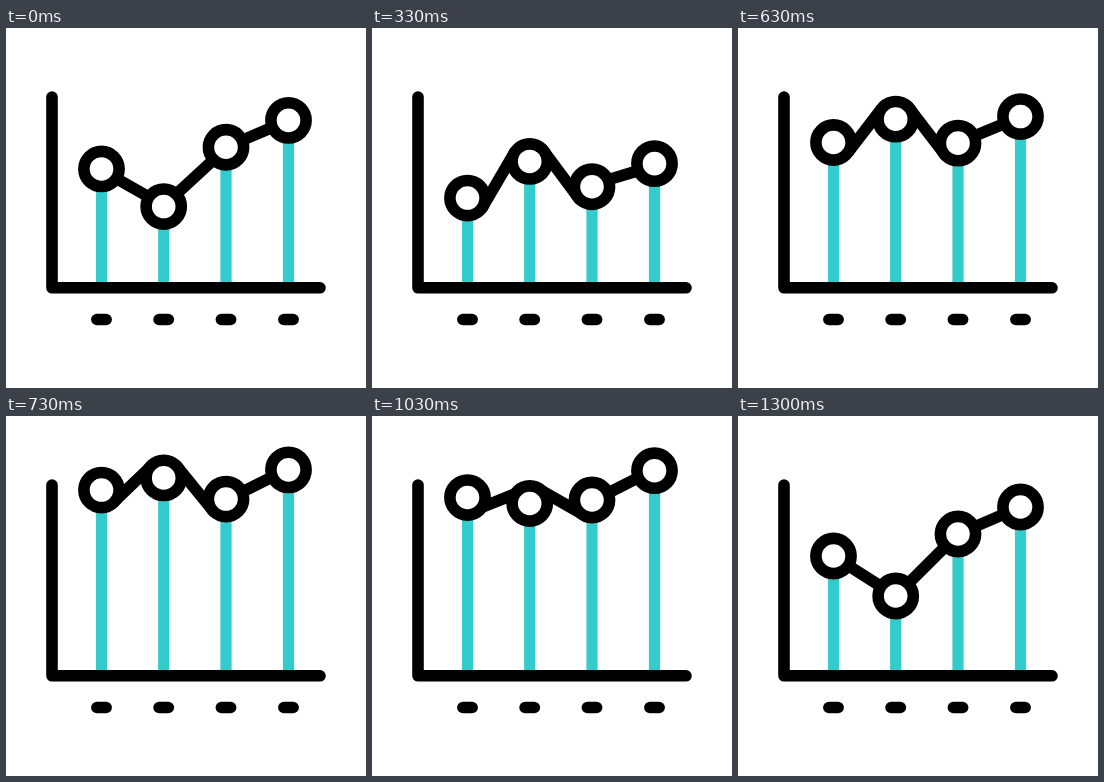
An HTML page that plays this animation: 360x360 px, repeating every 1.67 s.

```html
<!DOCTYPE html>
<html>
<head>
<meta charset="utf-8">
<title>Line chart</title>
<style>
html, body { margin: 0; width: 100%; height: 100%; overflow: hidden; background: #fff; }
svg { display: block; width: 100vw; height: 100vh; }
</style>
</head>
<body>
<svg viewBox="0 0 360 360" fill="none" stroke="#000" stroke-width="11.6" stroke-linecap="round" stroke-linejoin="round">
  <g id="bars" stroke="#33cccc" stroke-width="11.2" stroke-linecap="butt"></g>
  <path d="M46 69V259.8H314"/>
  <g id="ticks"></g>
  <g id="links"></g>
  <g id="dots" fill="#fff"></g>
</svg>
<script>
const LOOP = 1670, STEP = 100 / 3, LAST = 39, R = 17.6;
const xs = [95.5, 157.7, 220, 282.5];
const rest = [140, 180, 118, 91];
const low = [171, 132, 160, 137];
const high = [58, 50.3, 70.3, 40.1];
const keys = [[-2, rest], [12, low], [26, high], [38.8, rest]];

function add(parent, tag, attrs) {
  const el = document.createElementNS('http://www.w3.org/2000/svg', tag);
  set(el, attrs);
  return document.getElementById(parent).appendChild(el);
}

function set(el, attrs) {
  for (const k in attrs) el.setAttribute(k, attrs[k]);
}

const bars = xs.map(x => add('bars', 'line', { x1: x, x2: x, y2: 258 }));
const dots = xs.map(x => add('dots', 'circle', { cx: x, r: R }));
xs.forEach(x => add('ticks', 'line', { x1: x - 4.6, x2: x + 4.6, y1: 291.5, y2: 291.5 }));

// Each link end keeps a fixed offset from its dot, set by the rest pose.
const links = [0, 1, 2].map(i => {
  const dx = xs[i + 1] - xs[i], dy = rest[i + 1] - rest[i];
  const k = R / Math.hypot(dx, dy);
  const el = add('links', 'line', { x1: xs[i] + dx * k, x2: xs[i + 1] - dx * k });
  return { el, off: dy * k };
});

function ease(u) {
  const half = v => Math.pow(2 * v, 2.25) / 2;
  return u < 0.5 ? half(u) : 1 - half(1 - u);
}

function pose(n) {
  let i = 0;
  while (i < keys.length - 2 && n >= keys[i + 1][0]) i++;
  const [t0, a] = keys[i], [t1, b] = keys[i + 1];
  const e = ease(Math.min(1, (n - t0) / (t1 - t0)));
  return a.map((y, j) => y + (b[j] - y) * e);
}

function draw(ms) {
  const n = Math.min(LAST, Math.floor((ms % LOOP + 5) / STEP));
  const ys = pose(n);
  ys.forEach((y, i) => {
    set(dots[i], { cy: y });
    set(bars[i], { y1: y + R });
  });
  links.forEach((l, i) => set(l.el, { y1: ys[i] + l.off, y2: ys[i + 1] - l.off }));
}

let start;
function tick(now) {
  if (start === undefined) start = now;
  draw(Math.max(0, now - start));
  requestAnimationFrame(tick);
}
draw(0);
requestAnimationFrame(tick);
</script>
</body>
</html>
```
